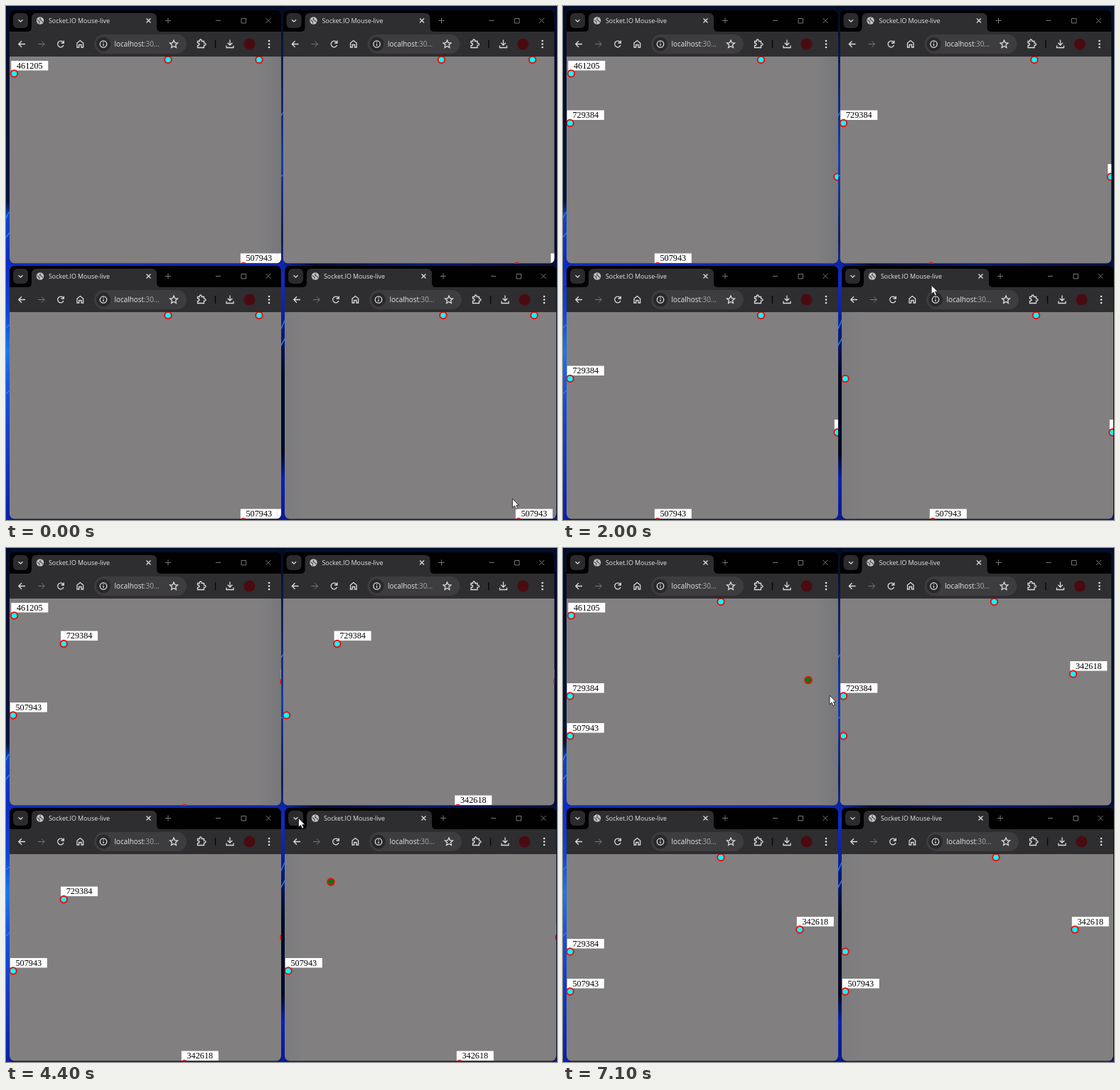
Write an HTML page that moves like this. It is 775x722 px and loops after 7200 ms.

```html
<!DOCTYPE html>
<html lang="en">
<head>
<meta charset="utf-8">
<title>Socket.IO Mouse-live</title>
<style>
  html, body { margin: 0; width: 100%; height: 100%; overflow: hidden; background: #030b22; }
  svg { display: block; }
  .ui { font-family: "Open Sans", "Noto Sans", sans-serif; fill: #e6e6e8; }
  .tag { font: 12.2px "Liberation Serif", "Times New Roman", serif; text-anchor: middle; }
  .line { fill: none; stroke: #dcdcde; stroke-width: 1.3; }
  .dim { stroke: #77767a; stroke-width: 1; }
</style>
</head>
<body>
<svg id="stage" width="775" height="722" viewBox="0 0 775 722">
  <defs>
    <linearGradient id="left" x2="0" y2="1">
      <stop offset="0" stop-color="#030c26"/><stop offset=".38" stop-color="#04143c"/>
      <stop offset=".41" stop-color="#0d45c8"/><stop offset=".5" stop-color="#0b2bc4"/>
      <stop offset=".6" stop-color="#0d46da"/><stop offset=".67" stop-color="#1a78f0"/>
      <stop offset=".75" stop-color="#1550e0"/><stop offset="1" stop-color="#0a20a8"/>
    </linearGradient>
    <linearGradient id="mid" x2="0" y2="1">
      <stop offset="0" stop-color="#030b20"/><stop offset=".15" stop-color="#06206a"/>
      <stop offset=".3" stop-color="#0b3cc8"/><stop offset=".45" stop-color="#051a60"/>
      <stop offset=".53" stop-color="#0f2cc8"/><stop offset=".6" stop-color="#0a22a0"/>
      <stop offset=".72" stop-color="#030a24"/><stop offset=".87" stop-color="#030a24"/>
      <stop offset=".92" stop-color="#0b22b4"/><stop offset="1" stop-color="#0a1a90"/>
    </linearGradient>
    <linearGradient id="row">
      <stop offset="0" stop-color="#0e2cbc"/><stop offset=".5" stop-color="#0c24a8"/>
      <stop offset=".56" stop-color="#050d38"/><stop offset=".75" stop-color="#0a1870"/>
      <stop offset="1" stop-color="#060f38"/>
    </linearGradient>
    <linearGradient id="shade">
      <stop offset="0" stop-color="#707276" stop-opacity="0"/>
      <stop offset="1" stop-color="#707276" stop-opacity=".6"/>
    </linearGradient>
    <clipPath id="frame"><rect x="5" y="6" width="382" height="355.5" rx="7"/></clipPath>
  </defs>
  <rect width="775" height="722" fill="#040e2c"/>
  <rect y="359" width="775" height="9" fill="url(#row)"/>
  <rect y="718" width="775" height="4" fill="#0a1b80"/>
  <rect width="8" height="722" fill="url(#left)"/>
  <rect x="384" width="9" height="722" fill="url(#mid)"/>
  <path d="M0 298Q3 290 7 288M0 325L7 316M0 452L7 446M0 545L7 538M386 155L391 148M386 240L391 236M386 455L393 440M386 478L393 466" fill="none" stroke="#2a7cf4" stroke-width="1.5"/>
  <g id="windows"></g>
  <path id="cursor" d="M0 0V12.6L3 9.9 5 14.6 7.3 13.6 5.3 9.2H9Z" fill="#fff" stroke="#222" stroke-width=".9"/>
</svg>
<script>
const LOOP = 7200, STEP = 100, LEAD = 100, LAG = 40;
const PAGE = { x: 5, y: 71, w: 382, h: 290.5 };
const LEFT = 5, RIGHT = 381, TOP = 4.5, BOTTOM = 294.5;

const user = (name, x, y, home) => ({ name, x: x + PAGE.x, y: y + PAGE.y, home, moves: [] });
const A = user('342618', 0, 0, [223, TOP]);
const B = user('507943', 384.5, 0, [329, BOTTOM]);
const C = user('86452', 0, 359, [351, TOP]);
const D = user('729384', 387, 359, [RIGHT, BOTTOM]);
const users = [A, B, C, D];

// One pointer wanders through the windows; each move starts where the last one ended.
const route = [];
let here = { t: 0, x: D.x + RIGHT, y: D.y + BOTTOM };

function go(who, t, x, y, bow = 0, felt = true) {
  const to = { t, x: x + who.x, y: y + who.y };
  const move = { from: here, to, bow };
  route.push(move);
  if (felt) who.moves.push(move);
  here = to;
}

go(D, 620, LEFT, 93.5);
go(C, 800, 374, 86);
go(C, 1250, 273.5, TOP);
go(A, 1600, RIGHT, 169, -40);
go(B, 1890, 128, BOTTOM, -40);
go(D, 2400, 127, 0, 0, false);  // across the toolbar
go(D, 2850, 156, TOP, 140);
go(B, 3180, LEFT, 164);
go(A, 3440, 246, BOTTOM, 60);
go(C, 3660, 258, 95);
go(C, 4200, 386, 117);
go(D, 4450, 40, TOP, 60);
go(B, 4800, 135, BOTTOM, -130);
go(D, 5170, 56, 131);
go(D, 5400, LEFT, 137);
go(C, 5600, 217, TOP, -20);
go(A, 5800, RIGHT, 207, -40);
go(B, 6000, 7.5, 209);
go(B, 6500, LEFT, 193, 150);
go(A, 7060, 328, 106, -110);
go(A, 7200, 370, 136);

// Straight line with a sine bow to one side.
function along({ from, to, bow }, t) {
  const p = Math.min(1, (t - from.t) / (to.t - from.t));
  const dx = to.x - from.x, dy = to.y - from.y;
  const side = bow * Math.sin(Math.PI * p) / Math.hypot(dx, dy);
  return [from.x + dx * p - dy * side, from.y + dy * p + dx * side];
}

const latest = (moves, t) => moves.filter(m => m.from.t <= t).pop();

function locate(who, t) {
  const move = latest(who.moves, t);
  if (!move) return { pos: who.home, active: false };
  const [x, y] = along(move, t);
  return { pos: [x - who.x, y - who.y], active: t <= move.to.t };
}

const path = (d, cls = '') => `<path class="line ${cls}" d="${d}"/>`;

const chrome = `
  <rect x="5" y="6" width="382" height="356" fill="#010101"/>
  <rect x="5" y="36" width="382" height="35" fill="#2e2d30"/>
  <path d="M30 36Q36 36 36 30V17Q36 10 43 10H205Q212 10 212 17V30Q212 36 218 36Z" fill="#2e2d30"/>
  <rect x="10" y="10" width="21" height="21" rx="6" fill="#2b2a2d"/>
  ${path('M17.5 19.2L20.5 22.2 23.5 19.2')}
  <circle cx="48" cy="20.5" r="5.2" fill="#c4c4c8"/>
  <path d="M43.8 19.5L47 22V24.5M48.5 16.5L47.5 19 50 20.5 52 23" fill="none" stroke="#4a494c" stroke-width="1.2"/>
  <text class="ui" x="60" y="24" font-size="8.9">Socket.IO Mouse-live</text>
  ${path('M197.5 17.5l6 6m0-6l-6 6')}
  ${path('M224 20.5h8m-4-4v8M295 20.5h7M331 17.5h6.5v6.5h-6.5zM365.5 17l7 7m0-7l-7 7', 'dim')}
  ${path('M27 53.5H18m4-4.2L17.8 53.5 22 57.7')}
  ${path('M45 53.5h9m-4-4.2l4.2 4.2-4.2 4.2', 'dim')}
  ${path('M80.5 51A4.3 4.3 0 1 0 81 55M81.3 48.5V52H77.5')}
  ${path('M100 58V52L104.3 48.6 108.6 52V58H106V54.5H102.7V58Z')}
  <rect x="124" y="40" width="130" height="27" rx="13.5" fill="#3d3c3f"/>
  <circle cx="137" cy="53.5" r="10" fill="#29282b"/>
  <circle class="line" cx="137" cy="53.5" r="4.7"/>
  ${path('M137 53v3M137 50.6v1.2')}
  <text class="ui" x="152.5" y="57" font-size="9.9">localhost<tspan fill="#aaa9ad">:30...</tspan></text>
  ${path('M236 48l1.6 3.6 3.9.4-2.9 2.6.8 3.9-3.4-2-3.4 2 .8-3.9-2.9-2.6 3.9-.4z')}
  ${path('M269.5 49.5H272.3Q272 47 273.7 47T275.2 49.5H278.5V52.2Q281 52 281 53.7T278.5 55.2V58.5H269.5V55.5Q272 55.3 272 53.7T269.5 52Z')}
  <path d="M294.5 48v11" stroke="#070707" stroke-width="1.4"/>
  ${path('M315 47.5v7.5m-3.3-3.2l3.3 3.3 3.3-3.3M310 55.5V58.5H320V55.5')}
  <circle cx="342.5" cy="53.5" r="8" fill="#4a0b10"/>
  ${[49, 53.5, 58].map(y => `<circle cx="370" cy="${y}" r="1.3" fill="#e2e2e4"/>`).join('')}
  <rect x="5" y="71" width="382" height="291" fill="#817f80"/>`;

function marker(name, x = 0, y = 0) {
  const w = 15.4 + name.length * 6.1;
  const tag = name && `<rect x="-4.2" y="-18" width="${w}" height="13.5" fill="#fff"/>
    <text class="tag" x="${w / 2 - 4.2}" y="-7.3">${name}</text>`;
  return `<g transform="translate(${x} ${y})">${tag}
    <circle r="4.8" fill="#00ffff" stroke="#f00a0a" stroke-width="2"/></g>`;
}

const shades = new Map([
  [A, '<rect x="355" y="71" width="32" height="291" fill="url(#shade)"/>'],
  [D, '<rect x="-33" y="-362" width="33" height="291" transform="scale(-1)" fill="url(#shade)" opacity=".6"/>']
]);

document.getElementById('windows').innerHTML = users.map(owner => `
  <g transform="translate(${owner.x - PAGE.x} ${owner.y - PAGE.y})"><g clip-path="url(#frame)">
    ${chrome}${shades.get(owner) || ''}
    <svg x="${PAGE.x}" y="${PAGE.y}" width="${PAGE.w}" height="${PAGE.h}" overflow="hidden">
      ${owner === A ? marker('461205', 6.5, 24) : ''}
      <g class="live">${users.map(u => marker(u === owner ? '' : u.name)).join('')}</g>
    </svg>
  </g></g>`).join('');

const layers = [...document.querySelectorAll('.live')].map(g => [...g.children]);
const cursor = document.getElementById('cursor');
const place = (el, [x, y]) => el.setAttribute('transform', `translate(${x} ${y})`);

function draw(t) {
  layers.forEach((marks, w) => marks.forEach((el, i) => {
    const own = w === i;
    const { pos, active } = locate(users[i], own ? t : t - LAG);
    place(el, pos);
    if (own) el.lastElementChild.setAttribute('fill', active ? '#087808' : '#00ffff');
  }));
  place(cursor, along(latest(route, t + LEAD), t + LEAD));
  cursor.style.display = t >= 5000 && t < 6400 ? 'none' : '';
}

const start = performance.now();
function tick(now) {
  const t = Math.max(0, now - start) % LOOP;
  draw(Math.floor(t / STEP) * STEP);
  requestAnimationFrame(tick);
}
draw(0);
requestAnimationFrame(tick);
</script>
</body>
</html>
```
